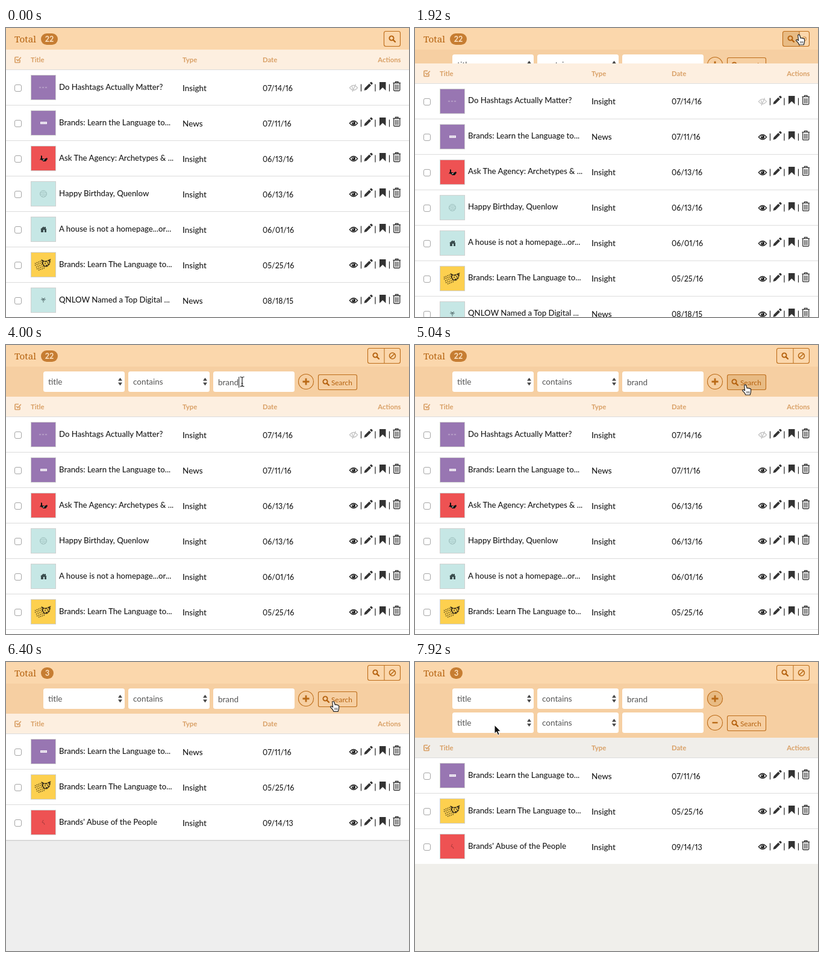
An HTML page that plays this animation: 669 by 481 pixels, repeating every 8000 ms.

```html
<!DOCTYPE html>
<html lang="en">
<head>
<meta charset="utf-8">
<title>Filtered list</title>
<style>
  html, body { margin: 0; width: 100%; height: 100%; overflow: hidden; background: #eee; }
  #stage { display: block; font: 13.5px Lato, "Open Sans", sans-serif; fill: #1c1c1c; }
  .total { font: 15.2px "Noto Serif", serif; fill: #b5620f; }
  .count { font-weight: 700; font-size: 12.5px; fill: #fde3c4; text-anchor: middle; }
  .head text { font-weight: 700; font-size: 11.3px; fill: #d9a066; }
  .head .end { text-anchor: end; }
  #rows text { font-weight: 500; }
  #rows .name { font-size: 13.2px; }
  #rows .date { font-size: 12.5px; font-variant-numeric: proportional-nums; }
  .field { fill: #555; }
  .small { font-size: 11.8px; fill: #b5620f; }
  .line { fill: none; stroke: #b96a17; }
  .btn { fill: transparent; stroke: #bd6c18; stroke-width: 1.1; }
  .btn.on { fill: #e8bb84; }
  .ink { fill: none; stroke: #222; }
  .blank text, .blank .icon { display: none; }
</style>
</head>
<body>
<svg id="stage" width="669" height="481" viewBox="0 0 669 481">
  <defs>
    <g id="lens" fill="none" stroke="#b5620f">
      <circle cx="-1" cy="-1" r="3.6" stroke-width="1.9"/>
      <path d="M1.8 1.8L5 5" stroke-width="2.4" stroke-linecap="round"/>
    </g>
    <g id="sort" fill="#444"><path d="M-3.5-1.5L0-6.5L3.5-1.5ZM-3.5 1.5L0 6.5L3.5 1.5Z"/></g>
    <g id="eye">
      <path d="M-6.5 0Q0-8 6.5 0Q0 8-6.5 0Z" fill="none" stroke="#222" stroke-width="1.5"/>
      <circle r="3" fill="#222"/><circle cx="-1" cy="-1" r=".9" fill="#fff"/>
    </g>
    <g id="shut" fill="none" stroke="#c4c4c4" stroke-width="1.4">
      <path d="M-6.5 0Q0-8 6.5 0Q0 8-6.5 0ZM3.5-6L-2 6.5"/><path d="M-2-2Q-3 1 0 2.5"/>
    </g>
    <g id="tools" fill="#333">
      <path d="M594.5 5L595.5 1L603-6.5L606-3.5L598.5 4ZM603.9-7.4L605.5-9Q606.2-9.5 606.9-9L608.5-7.4Q609-6.700 608.500-6L606.900-4.400Z"/>
      <path d="M620-9h10.5v14l-5.25-5l-5.25 5Z"/>
      <g fill="none" stroke="#333" stroke-width="1.3">
        <path d="M642.5-7.5h12.500M646.500-7.500v-2h4.500v2M643.700-7v11q0 1.500 1.500 1.500h7.100q1.500 0 1.500-1.500v-11"/>
        <path d="M646.500-5v8.500M648.750-5v8.500M651-5v8.500" stroke-width="1.100"/>
      </g>
      <path d="M589.500-5.500v12M613-5.500v12M636.500-5.500v12" stroke="#222" stroke-width="1.2"/>
    </g>
    <g id="arrow"><path d="M0 0V14.2L3.3 11.2L5.6 16.6L8.2 15.5L5.9 10.3H10.2Z" fill="#111" stroke="#fff" stroke-width="1"/></g>
    <g id="hand">
      <path d="M-1.3 1.2Q0-.7 1.6 1L3.2 6Q4.6 4.9 5.6 6.2Q7 5.4 7.7 6.8Q9.3 6.3 9.6 8L9.5 12.4L8.2 17H.8L-.5 14.2L-4.4 9.8Q-4.2 7.8-2.2 8.6L-.4 10Z" fill="#fff" stroke="#222" stroke-width="1.2" stroke-linejoin="round"/>
      <path d="M2.8 11v3.5M4.8 11v3.5M6.8 11v3.5" class="ink" stroke-width=".8"/>
    </g>
    <g id="ibeam" class="ink" stroke-width="1.2"><path d="M-3.5-8Q0-8 0-6Q0-8 3.5-8M0-6V6M-3.5 8Q0 8 0 6Q0 8 3.5 8M-1.5 3h3"/></g>
  </defs>

  <rect id="page" width="669" height="481"/>
  <g id="list">
    <g id="rows"></g>
    <g class="head">
      <rect id="headBg" y="36" width="669" height="33"/>
      <path class="icon" d="M23 53v3.5q0 1-1 1h-6q-1 0-1-1v-7q0-1 1-1h5M17.2 51.8l2.6 2.6l5-5.6" fill="none" stroke="#d9a066" stroke-width="1.7"/>
      <text x="41" y="57">Title</text><text x="293" y="57">Type</text>
      <text x="426" y="57">Date</text><text x="655.5" y="57" class="end">Actions</text>
    </g>
  </g>

  <svg id="panel" y="36" width="669" height="0">
    <rect width="669" height="90" fill="#f6cfa2"/>
    <g id="first"></g>
    <g id="second"></g>
    <text id="typed" class="field" x="352" y="30.5"></text>
    <rect id="caret" y="17" width="1" height="18" fill="#222"/>
    <circle id="plus" class="btn" cx="498" cy="25" r="12.5"/>
    <path class="line" stroke-width="2.8" d="M492.5 25h11M498 19.5v11"/>
    <circle class="btn" cx="498" cy="65" r="12.5"/>
    <path class="line" stroke-width="2.4" d="M493.5 65h9"/>
    <g id="search">
      <rect id="searchBox" class="btn" x="518.5" y=".5" width="64" height="25" rx="2.5"/>
      <use href="#lens" x="531" y="13"/>
      <text class="small" x="540" y="17.5">Search</text>
    </g>
  </svg>

  <g id="bar">
    <rect width="669" height="36" fill="#fbd7ac"/>
    <text class="total" x="14" y="24">Total</text>
    <rect id="badge" y="9" height="19" rx="9.5" fill="#c67d32"/>
    <text id="count" class="count" y="23"></text>
    <rect id="lensBg" y="5.5" width="28" height="25" rx="2.5" fill="#e8bb84"/>
    <g id="ban" class="line" stroke-width="1.6"><circle r="5"/><path d="M-3.5 3.5L3.5-3.5"/></g>
    <path id="split" class="line" d="M0 5.5v25"/>
    <rect id="group" class="btn" y="5.5" height="25" rx="3"/>
    <use id="glass" class="icon" href="#lens" y="18"/>
  </g>
  <use id="cursor"/>
</svg>

<script>
const $ = id => document.getElementById(id);
const set = (id, attrs) => { for (const k in attrs) $(id).setAttribute(k, attrs[k]); };
const show = (id, on) => { $(id).style.display = on ? '' : 'none'; };

// Thumbnails: background and a small drawing centred on 0,0
const thumbs = {
  marks: ['#9876b2', '<path d="M-7-1l3 2m0-2l-3 2M-2-1l3 2m0-2l-3 2M3-1l3 2m0-2l-3 2" stroke="#b9a3c9" fill="none"/>'],
  label: ['#9876b2', '<rect x="-5" y="-2" width="11" height="4" fill="#f3eef6"/><path d="M-3.5 0h8" stroke="#b9a6c6" stroke-dasharray="2 1"/>'],
  bird: ['#ee5253', '<path d="M-4-5l2 1l0 4l4 1l4-2l1 2l-3 4l-4 0l-4-3l-2 1l2-4Z" fill="#111"/><path d="M-1 3l3-1" stroke="#fff"/>'],
  ball: ['#c6e7e5', '<g fill="none" stroke="#9dbfbd"><circle r="5.5"/><path d="M-5-1q5-4 10 0M-5 2q5-4 10 0M-3 4q3-3 7 0"/></g>'],
  house: ['#c6e7e5', '<path d="M-5 0L0-4.500L2-3v-1h2v3l2 1h-1v5H2V1H0v4H-4V0Z" fill="#3c4f50"/>'],
  cats: ['#fdd04f', `<path d="M-14-2l12-5M-14 1l13-5M-12 4l12-5M-11 7l13-5M-8 9l11-4" fill="none" stroke="#57471b" stroke-width="1.600" stroke-dasharray="1.500 1.500"/>
    <path d="M-2-7l4 2l4-1l5-2l-1 6l-3 4l-5 1l-3-4Z" fill="none" stroke="#3d321a" stroke-width="2.200" stroke-dasharray="4 1"/><path d="M2-2h2m2-1h2M4 1h3" stroke="#3d321a" stroke-width="1.500"/>`],
  palm: ['#c6e7e5', '<path d="M0 4V-1M-4-1L0-2L4-1M-3-4L0-2L3-4M-2 1L0-2L2 1" stroke="#5b7475" fill="none"/>'],
  spark: ['#ee5253', '<path d="M0-4l-2 4l3 1l1 3" stroke="#a93a3c" fill="none"/>']
};

const learn = ['label', 'Brands: Learn the Language to...', 'News', '07/11/16'];
const learn2 = ['cats', 'Brands: Learn The Language to...', 'Insight', '05/25/16'];
const abuse = ['spark', "Brands' Abuse of the People", 'Insight', '09/14/13'];
const every = [
  ['marks', 'Do Hashtags Actually Matter?', 'Insight', '07/14/16'],
  learn,
  ['bird', 'Ask The Agency: Archetypes &amp; ...', 'Insight', '06/13/16'],
  ['ball', 'Happy Birthday, Quenlow', 'Insight', '06/13/16'],
  ['house', 'A house is not a homepage...or...', 'Insight', '06/01/16'],
  learn2,
  ['palm', 'QNLOW Named a Top Digital ...', 'News', '08/18/15']
];
const found = [learn, learn2, abuse];

function row([thumb, title, type, date], y, h) {
  const [color, art] = thumbs[thumb];
  const pic = h < 59 ? '<path d="M41 20h2" stroke="#aaa"/>' :
    `<rect x="41.5" y="9.5" width="41" height="41" fill="${color}" stroke="#cfd0cf"/>
     <g transform="translate(62 30)">${art}</g>`;
  return `<g transform="translate(0 ${y})">
    <rect width="669" height="${h}" fill="#fff"/><rect width="669" height="1" fill="#dcdcdc"/>
    <rect x="14.5" y="${h / 2 - 4}" width="11" height="11" rx="2.5" fill="#fff" stroke="#a5a5a5"/>${pic}
    <text x="88" y="33.5" class="name">${title}</text><text x="293" y="35.5">${type}</text>
    <text x="426" y="35.5" class="date">${date}</text>
    <g class="icon"><use href="#${thumb === 'marks' ? 'shut' : 'eye'}" x="577" y="30.5"/><use href="#tools" y="30"/></g>
  </g>`;
}

function table(id, data, heights = []) {
  let y = 69;
  const body = data.map((d, i) => {
    const h = heights[i] || 59, out = row(d, y, h);
    y += h;
    return out;
  }).join('');
  return `<g id="${id}">${body}<rect class="edge" y="${y}" width="669" height="2" fill="#d9d9d9"/></g>`;
}
$('rows').innerHTML = table('all', every) + table('hits', found) + table('partial', found, [59, 37, 59]);

const filters = y => [62, 203, 344].map((x, i) =>
  `<rect x="${x}" y="${y}" width="135" height="34" rx="3.5" fill="#fff"/>` +
  (i < 2 ? `<text class="field" x="${x + 8}" y="${y + 22}">${['title', 'contains'][i]}</text>
    <use href="#sort" x="${x + 127.5}" y="${y + 17}"/>` : '')).join('');
$('first').innerHTML = filters(8);
$('second').innerHTML = filters(48);

const ramp = (t, a, b) => {
  const p = Math.min(1, Math.max(0, (t - a) / (b - a)));
  return 0.5 - 0.5 * Math.cos(Math.PI * p);
};

// Pointer moves: start, end, then the control point and the end point
const moves = [
  [270, 960, 700, 90, 622, 19],
  [1040, 1360, 622, 17, 625, 16],
  [1360, 1600, 631, 13, 637, 11],
  [1920, 2640, 510, 14, 392, 61],
  [4400, 5040, 470, 56, 548, 66],
  [6320, 6720, 522, 62, 497, 64],
  [7200, 7920, 330, 66, 132, 105]
];
function pointer(t) {
  let x = 444, y = 401;
  for (const [a, b, cx, cy, ex, ey] of moves) {
    if (t < a) break;
    const u = ramp(t, a, b), v = 1 - u;
    x = v * v * x + 2 * u * v * cx + u * u * ex;
    y = v * v * y + 2 * u * v * cy + u * u * ey;
  }
  return [x, y];
}
const inside = (x, y, l, t, r, b) => x >= l && x <= r && y >= t && y <= b;
function shape(x, y) {
  if (inside(x, y, 627, 5, 655, 31) || inside(x, y, 518, 49, 583, 75) ||
      Math.hypot(x - 498, y - 61) < 13) return 'hand';
  return inside(x, y, 344, 44, 479, 78) || inside(x, y, 344, 84, 479, 118) ? 'ibeam' : 'arrow';
}

const keys = [3520, 3600, 3760, 3840, 4000];

function draw(t) {
  const reloaded = t >= 5760, blank = reloaded && t < 6000, late = t >= 6880;
  const closed = reloaded && t < 6080;
  const open = closed ? 0 : ramp(t, 1778, 2078);
  const h = 50 * open + 40 * ramp(t, 6840, 7140);

  $('stage').classList.toggle('blank', blank);
  set('page', { fill: late ? '#f0efeb' : reloaded ? '#eee' : '#fff' });
  set('headBg', { fill: late ? '#f0eeea' : '#fdefe0' });
  show('all', !reloaded);
  show('partial', reloaded && t < 5840);
  show('hits', t >= 5840);
  document.querySelectorAll('.edge').forEach(e => e.setAttribute('opacity', late ? 0 : 1));
  set('list', { transform: `translate(0 ${h})` });

  set('panel', { height: h });
  show('panel', h > 0);
  show('second', late);
  set('search', { transform: `translate(0 ${Math.max(13, h - 37)})` });
  $('searchBox').classList.toggle('on', t >= 4880 && !reloaded);
  $('plus').classList.toggle('on', t >= 6640);
  $('typed').textContent = 'brand'.slice(0, keys.filter(k => t >= k).length);
  show('caret', (t >= 2640 && t < 3200) || (t >= 3520 && t < 4480));
  if (h > 0) set('caret', { x: 352 + $('typed').getComputedTextLength() });

  const bw = blank ? 20 : reloaded ? 21 : 28, bx = blank ? 54 : 58;
  set('badge', { x: bx, width: bw });
  set('count', { x: bx + bw / 2 });
  $('count').textContent = reloaded ? '3' : '22';

  const p = closed ? 0 : ramp(t, 1745, 2045);
  const gx = blank ? 630.5 : 627.5 - 27 * p;
  set('group', { x: gx, width: 654.5 - gx });
  set('glass', { x: gx + 13.5 });
  set('lensBg', { x: gx });
  show('lensBg', t >= 1520 && t < 2160);
  set('split', { transform: `translate(${gx + 27.5} 0)`, opacity: p > 0 ? 1 : 0 });
  set('ban', { transform: `translate(${gx + 27.5 + 13.5 * p} 18) scale(${p})`, opacity: p });

  const [x, y] = pointer(t);
  show('cursor', t >= 320);
  set('cursor', { href: '#' + shape(x, y), x, y });
}

const start = performance.now();
function tick(now) {
  const t = Math.max(0, now - start) % 8000;
  draw(Math.floor(t / 80) * 80);
  requestAnimationFrame(tick);
}
draw(0);
requestAnimationFrame(tick);
</script>
</body>
</html>
```
